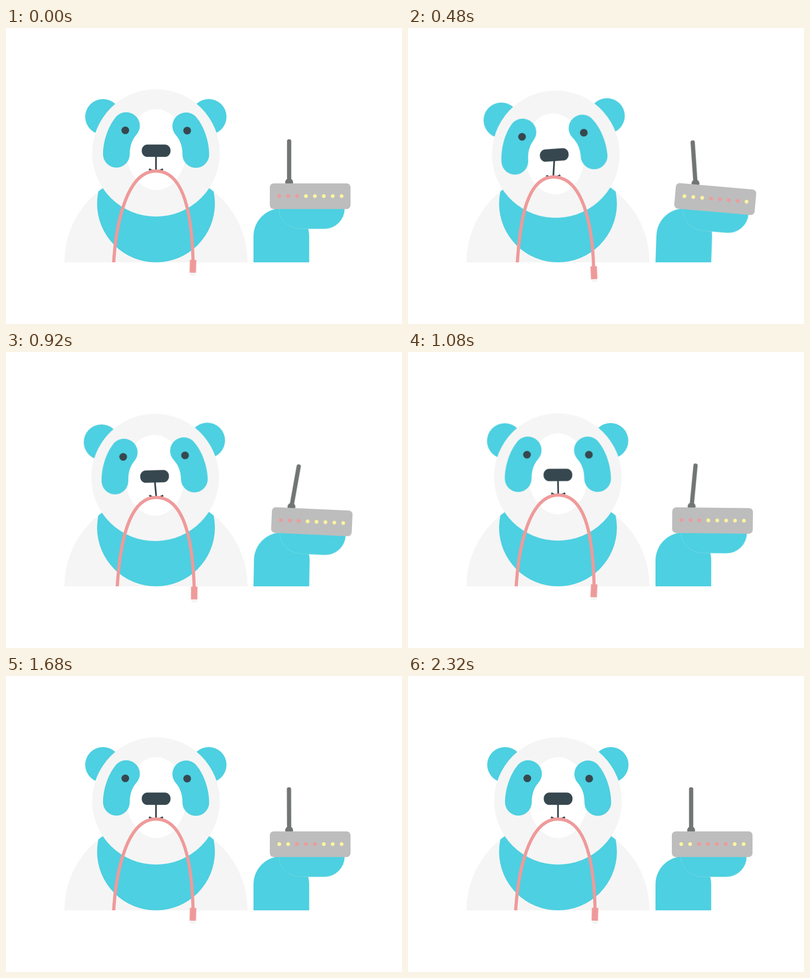
These frames come from a looping animation (800x600 px, 2360 ms). An HTML page without scripts:

```html
<!DOCTYPE html>
<html lang="en">
<head>
<meta charset="utf-8">
<title>Panda with router</title>
<style>
  :root {
    --cyan: #4dd0e1;
    --pale: #f5f5f5;
    --ink: #37474f;
    --pink: #ef9a9a;
    --yellow: #fff59d;
  }
  html, body { margin: 0; width: 100%; height: 100%; overflow: hidden; background: #fff; }
  svg { display: block; width: 100%; height: 100%; }

  .cyan { fill: var(--cyan); }
  .pale { fill: var(--pale); }
  .ink { fill: var(--ink); }
  .pink { fill: var(--pink); }

  .head, .face, .arm, .router, .antenna, .plug, .cord, .mouth {
    animation: 2360ms cubic-bezier(.333, 0, .667, 1) infinite;
  }
  .head, .face { transform-origin: 303px 360px; }
  .head { animation-name: head; }
  .face { animation-name: face; }
  .arm { transform-origin: 556px 475px; animation-name: arm; }
  .router { transform-origin: 552.5px 414px; animation-name: router; }
  .antenna { transform-origin: 572px 313px; animation-name: antenna; }
  .cord, .mouth, .plug { animation-timing-function: linear; }
  .cord { fill: none; stroke: var(--pink); stroke-width: 6.5; animation-name: cord; }
  .mouth { fill: none; stroke: var(--ink); stroke-width: 3.4; animation-name: mouth; }
  .plug { animation-name: plug; }

  @keyframes head {
    0%, 8.5%, 49.2%, 100% { transform: none; }
    23.7% { transform: translateY(2.8px) rotate(-2.7deg); }
  }
  @keyframes face {
    0%, 8.5%, 49.2%, 100% { transform: none; }
    23.7% { transform: translateY(9.5px) rotate(-4.6deg); }
  }
  @keyframes arm {
    0%, 50.4%, 100% { transform: none; }
    26.3% { transform: rotate(2.3deg); }
  }
  @keyframes router {
    0%, 50.4%, 100% { transform: none; }
    26.3% { transform: rotate(5.8deg); }
  }
  @keyframes antenna {
    0%, 93.2%, 100% { transform: rotate(0deg); }
    24.2% { transform: rotate(-9.6deg); }
    40.7% { transform: rotate(8deg); }
    55.9% { transform: rotate(-4deg); }
    66.1% { transform: rotate(2deg); }
    74.6% { transform: rotate(-1.4deg); }
    84.7% { transform: rotate(.5deg); }
  }
  @keyframes cord {
    0%, 8.5%, 67.8%, 100% { d: path("M217 485C221 400 243 290 303 290S376 390 378 474"); }
    13.56% { d: path("M218 489C222 404 239 293.5 299 293.5S375 394 377 478"); }
    20.34% { d: path("M219.5 497C224 412 234 302 294 302S373 403 375 487"); }
    23.7% { d: path("M223 498C228 412 236 303.5 296 303.5S375 404 377 488"); }
    32.2% { d: path("M230 494C234 408 243.5 299.5 303.5 299.5S382 400 384.5 484"); }
    45.76% { d: path("M218 486C222 400 243.5 290 303.5 290S374 390 376 475"); }
  }
  @keyframes mouth {
    0%, 8.5%, 67.8%, 100% { d: path("M303 260L303 289m-14 -3q7 5 14 3q7 2 14 -3"); }
    13.56% { d: path("M301 263L299.3 292.5m-14 -3q7 5 14 3q7 2 14 -3"); }
    20.34% { d: path("M295.5 268L293.5 301m-14 -2q7 5 14 2q7 2 14 -3"); }
    23.7% { d: path("M294.5 270L295.5 302.5m-14 -2q7 5 14 2q7 2 14 -3"); }
    32.2% { d: path("M298.5 266L303.5 298.5m-14 -3q7 5 14 3q7 2 14 -3"); }
    45.76% { d: path("M303 260.5L303.5 289m-14 -3q7 5 14 3q7 2 14 -3"); }
  }
  @keyframes plug {
    0%, 8.5%, 67.8%, 100% { transform: translate(378px, 470px) rotate(1.5deg); }
    13.56% { transform: translate(377px, 474px) rotate(0deg); }
    20.34% { transform: translate(375px, 483px) rotate(-2.5deg); }
    23.7% { transform: translate(377px, 484px) rotate(-3deg); }
    32.2% { transform: translate(384.3px, 480px) rotate(-2.5deg); }
    45.76% { transform: translate(376.3px, 471px) rotate(3deg); }
  }

  .lights circle { fill: var(--yellow); animation: 2360ms step-end infinite; }
  .lights .a { animation-name: a; }
  .lights .b { animation-name: b; }
  .lights .c { animation-name: c; }
  .lights .d { animation-name: d; }
  .lights .e { animation-name: e; }
  .lights .f { animation-name: f; }
  @keyframes a {
    0%, 38.9%, 74.5% { fill: var(--pink); }
    16.9%, 59.2%, 84.6% { fill: var(--yellow); }
  }
  @keyframes b {
    0%, 27%, 66% { fill: var(--pink); }
    16.9%, 59.2%, 84.6% { fill: var(--yellow); }
    91.4%, 100% { fill: var(--pink); }
  }
  @keyframes c {
    0%, 38.9%, 74.5% { fill: var(--yellow); }
    16.9%, 59.2%, 84.6%, 100% { fill: var(--pink); }
  }
  @keyframes d {
    0%, 38.9%, 74.5%, 91.4% { fill: var(--yellow); }
    16.9%, 59.2%, 84.6%, 98.2%, 100% { fill: var(--pink); }
  }
  @keyframes e {
    0%, 38.9%, 66% { fill: var(--yellow); }
    16.9%, 59.2%, 84.6%, 100% { fill: var(--pink); }
  }
  @keyframes f {
    0%, 27%, 66%, 91.4% { fill: var(--yellow); }
    16.9%, 59.2%, 84.6% { fill: var(--pink); }
  }
</style>
</head>
<body>
<svg viewBox="0 0 800 600">
  <defs>
    <clipPath id="floor"><rect width="800" height="475"/></clipPath>
    <clipPath id="torso"><circle cx="303" cy="475" r="185"/></clipPath>
    <clipPath id="desk"><path d="M0 0H800V600H300V475H0Z"/></clipPath>
    <path id="patch" d="M196 256C196 232 205 202 220 183A27.5 27.5 0 1 1 263 217Q250 232 250 256A27 27 0 0 1 196 256Z"/>
  </defs>

  <g clip-path="url(#floor)">
    <circle class="pale" cx="303" cy="475" r="185"/>
    <circle class="cyan" cx="303" cy="356" r="119" clip-path="url(#torso)"/>
  </g>

  <g class="head">
    <g class="cyan">
      <circle cx="196" cy="180" r="36"/>
      <circle cx="409.5" cy="180" r="36"/>
    </g>
    <circle class="pale" cx="303" cy="253.3" r="129"/>
  </g>

  <g class="face">
    <ellipse cx="303.5" cy="246.5" rx="60.5" ry="82" fill="#fff"/>
    <g class="cyan">
      <use href="#patch"/>
      <use href="#patch" transform="translate(606.5 .5) scale(-1 1)"/>
    </g>
    <g class="ink">
      <circle cx="241" cy="207.5" r="7.8"/>
      <circle cx="366" cy="208" r="7.8"/>
      <rect x="274.3" y="236.3" width="58" height="25" rx="11.5"/>
    </g>
  </g>

  <path class="mouth" d="M303 260L303 289m-14 -3q7 5 14 3q7 2 14 -3"/>
  <g clip-path="url(#desk)">
    <path class="cord" d="M217 485C221 400 243 290 303 290S376 390 378 474"/>
    <g class="plug">
      <rect class="pale" x="-5.5" y="25" width="11.5" height="7"/>
      <rect class="pink" x="-6.5" width="13" height="26"/>
    </g>
  </g>

  <g clip-path="url(#floor)">
    <path class="arm cyan" d="M500 485V422A56 56 0 0 1 612.5 422V485Z"/>
  </g>
  <g class="router">
    <path class="cyan" stroke="#7cdbe6" stroke-width=".7" d="M551 362V366A45 41 0 0 0 596 407H643A41 41 0 0 0 684 366V362Z"/>
    <g class="antenna" fill="#717573">
      <rect x="567.7" y="225.5" width="8.6" height="88" rx="4"/>
      <circle cx="572" cy="313" r="8"/>
    </g>
    <rect x="533" y="315" width="163" height="52" rx="8" fill="#bdbdbd"/>
    <g class="lights">
      <circle class="a" cx="552" cy="340.7" r="3.7"/>
      <circle class="a" cx="570" cy="340.7" r="3.7"/>
      <circle class="b" cx="588" cy="340.7" r="3.7"/>
      <circle class="c" cx="606" cy="340.7" r="3.7"/>
      <circle class="d" cx="624" cy="340.7" r="3.7"/>
      <circle class="e" cx="642" cy="340.7" r="3.7"/>
      <circle class="f" cx="660" cy="340.7" r="3.7"/>
      <circle cx="678" cy="340.7" r="3.7"/>
    </g>
  </g>
</svg>
</body>
</html>
```
